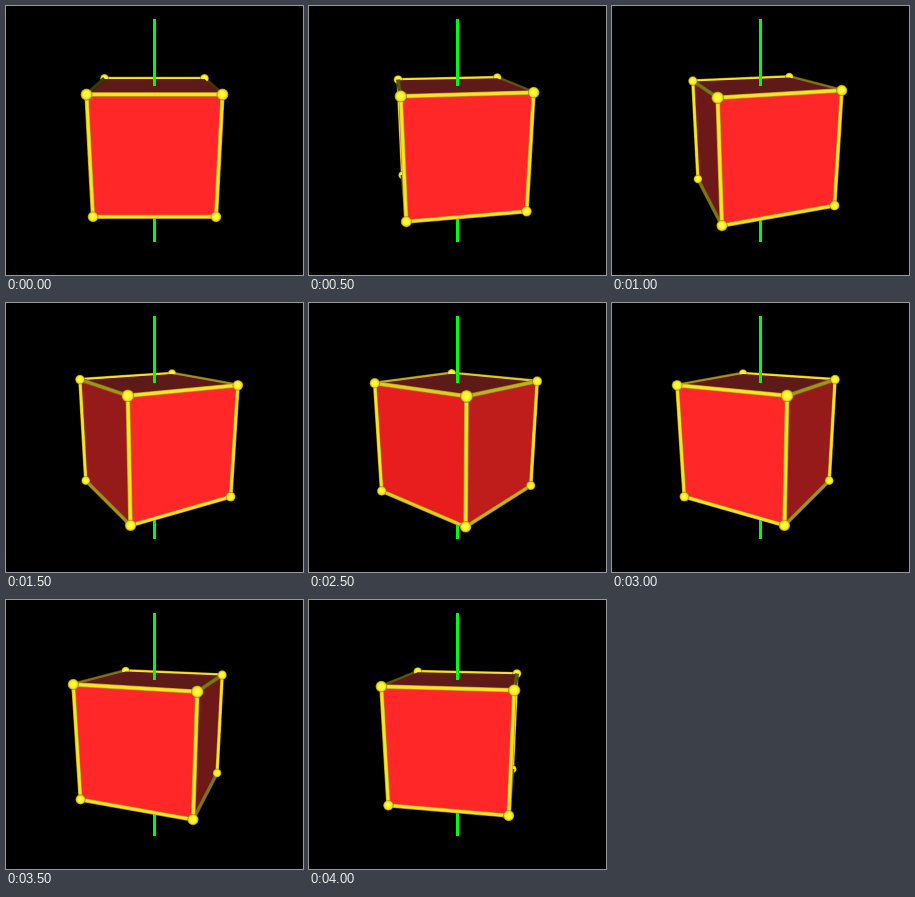
Write an HTML page without scripts that moves like this. It is 297 by 269 pixels and loops after 4500 ms.

```html
<!DOCTYPE html>
<html lang="en">
<head>
<meta charset="utf-8">
<title>Turning cube</title>
<style>
@property --turn { syntax: "<angle>"; inherits: true; initial-value: 0deg; }
@keyframes turn { from { --turn: 0deg; } to { --turn: 90deg; } }

html, body { margin: 0; width: 100%; height: 100%; overflow: hidden; background: #000; }

/* Camera: focal length 362.4, distance 6.571, pitch with sine .282 and cosine .959.
   Corners 0-3 are the top ring, 4, 5 and 7 the visible ones of the bottom ring. */
.scene {
  position: relative; width: 297px; height: 269px; overflow: hidden; background: #000;
  animation: turn 4500ms steps(9) infinite;
  --c: cos(var(--turn));
  --s: sin(var(--turn));
  --p: calc(var(--c) + var(--s));
  --q: calc(var(--s) - var(--c));

  --k0: calc(362.4 / (6.289 - .959 * var(--p)));
  --k1: calc(362.4 / (6.289 + .959 * var(--q)));
  --k2: calc(362.4 / (6.289 + .959 * var(--p)));
  --k3: calc(362.4 / (6.289 - .959 * var(--q)));
  --k4: calc(362.4 / (6.853 - .959 * var(--p)));
  --k5: calc(362.4 / (6.853 + .959 * var(--q)));
  --k7: calc(362.4 / (6.853 - .959 * var(--q)));

  --x0: calc(1px * (148.5 + var(--k0) * var(--q)));
  --x1: calc(1px * (148.5 + var(--k1) * var(--p)));
  --x2: calc(1px * (148.5 - var(--k2) * var(--q)));
  --x3: calc(1px * (148.5 - var(--k3) * var(--p)));
  --x4: calc(1px * (148.5 + var(--k4) * var(--q)));
  --x5: calc(1px * (148.5 + var(--k5) * var(--p)));
  --x7: calc(1px * (148.5 - var(--k7) * var(--p)));

  --y0: calc(1px * (134.5 + var(--k0) * (.282 * var(--p) - .959)));
  --y1: calc(1px * (134.5 - var(--k1) * (.282 * var(--q) + .959)));
  --y2: calc(1px * (134.5 - var(--k2) * (.282 * var(--p) + .959)));
  --y3: calc(1px * (134.5 + var(--k3) * (.282 * var(--q) - .959)));
  --y4: calc(1px * (134.5 + var(--k4) * (.282 * var(--p) + .959)));
  --y5: calc(1px * (134.5 + var(--k5) * (.959 - .282 * var(--q))));
  --y7: calc(1px * (134.5 + var(--k7) * (.282 * var(--q) + .959)));
}
.scene > * { position: absolute; left: 0; top: 0; z-index: 3; }

/* start and end corners */
.a0 { --ax: var(--x0); --ay: var(--y0); --ak: var(--k0); }
.a1 { --ax: var(--x1); --ay: var(--y1); --ak: var(--k1); }
.a2 { --ax: var(--x2); --ay: var(--y2); --ak: var(--k2); }
.a3 { --ax: var(--x3); --ay: var(--y3); --ak: var(--k3); }
.a4 { --ax: var(--x4); --ay: var(--y4); --ak: var(--k4); }
.a5 { --ax: var(--x5); --ay: var(--y5); --ak: var(--k5); }
.a7 { --ax: var(--x7); --ay: var(--y7); --ak: var(--k7); }
.b1 { --bx: var(--x1); --by: var(--y1); --bk: var(--k1); }
.b2 { --bx: var(--x2); --by: var(--y2); --bk: var(--k2); }
.b3 { --bx: var(--x3); --by: var(--y3); --bk: var(--k3); }
.b4 { --bx: var(--x4); --by: var(--y4); --bk: var(--k4); }
.b5 { --bx: var(--x5); --by: var(--y5); --bk: var(--k5); }
.b7 { --bx: var(--x7); --by: var(--y7); --bk: var(--k7); }

/* light on the two sides */
.r { --l: var(--c); }
.l { --l: var(--s); }

.edge {
  --dx: calc(var(--bx) - var(--ax));
  --dy: calc(var(--by) - var(--ay));
  --g: min(1, .25 + .7 * var(--l, 1) + .2 * var(--l, 1) * var(--l, 1));
  --rim: rgb(calc(172 * var(--g)) calc(146 * var(--g)) calc(20 * var(--g)));
  --mid: rgb(calc(250 * var(--g)) calc(226 * var(--g)) calc(38 * var(--g)));
  width: hypot(var(--dx), var(--dy)); height: 10px;
  transform-origin: 0 0;
  transform: translate(var(--ax), var(--ay)) rotate(atan2(var(--dy), var(--dx)))
    scaleY(calc((var(--ak) + var(--bk)) * .0034)) translateY(-5px);
  background: linear-gradient(var(--rim), var(--mid) 28% 72%, var(--rim));
}
.dot {
  width: 20px; height: 20px; border-radius: 50%;
  transform-origin: 0 0;
  transform: translate(var(--ax), var(--ay)) scale(calc(var(--ak) * .0087)) translate(-10px, -10px);
  background: radial-gradient(circle closest-side at 50% 50%, #ffff50, #fff62c 45%, #f0e020 75%, #8a7c10);
}
.face {
  --v: calc(50 + 130 * var(--l) + 140 * var(--l) * var(--l));
  --w: min(39, 20 + 12 * var(--l) + max(0, var(--v) - 255));
  width: 297px; height: 269px;
  background: rgb(min(255, var(--v)) var(--w) var(--w));
}
.face.r { clip-path: polygon(var(--x0) var(--y0), var(--x1) var(--y1), var(--x5) var(--y5), var(--x4) var(--y4)); }
.face.l { clip-path: polygon(var(--x0) var(--y0), var(--x3) var(--y3), var(--x7) var(--y7), var(--x4) var(--y4)); }
.face.top {
  background: #5e1a18; transform: translateY(.6px);
  clip-path: polygon(var(--x0) var(--y0), var(--x1) var(--y1), var(--x2) var(--y2), var(--x3) var(--y3));
}
.axis { left: 147px; top: 13px; width: 3px; height: 67px; background: #00fa14; }
.axis.low { top: 150px; height: 86px; }

/* layers: 1 behind the faces, 2 faces, 3 in front */
.scene > .back { z-index: 1; }
.scene > .face { z-index: 2; }
.scene > .right { z-index: calc(clamp(1, 2 + (.7 - var(--q)) * 50, 3)); }
.scene > .left { z-index: calc(clamp(1, 2 + (.7 + var(--q)) * 50, 3)); }
.scene > .floor { z-index: calc(clamp(1, 2 + (var(--s) - .1) * 50, 3)); }
</style>
</head>
<body>
<div class="scene">
  <div class="axis low back"></div>
  <div class="edge a1 b2 l back"></div>
  <div class="edge a3 b2 r back"></div>
  <div class="dot a2 back"></div>

  <div class="face l"></div>
  <div class="face top"></div>
  <div class="face r"></div>

  <div class="axis"></div>
  <div class="edge a1 b5 right"></div>
  <div class="edge a3 b7 left"></div>
  <div class="edge a4 b7 l floor"></div>
  <div class="edge a4 b5 r"></div>
  <div class="edge a0 b3 l"></div>
  <div class="edge a0 b1 r"></div>
  <div class="edge a0 b4"></div>

  <div class="dot a1 right"></div>
  <div class="dot a5 right"></div>
  <div class="dot a3 left"></div>
  <div class="dot a7 left"></div>
  <div class="dot a4"></div>
  <div class="dot a0"></div>
</div>
</body>
</html>
```
